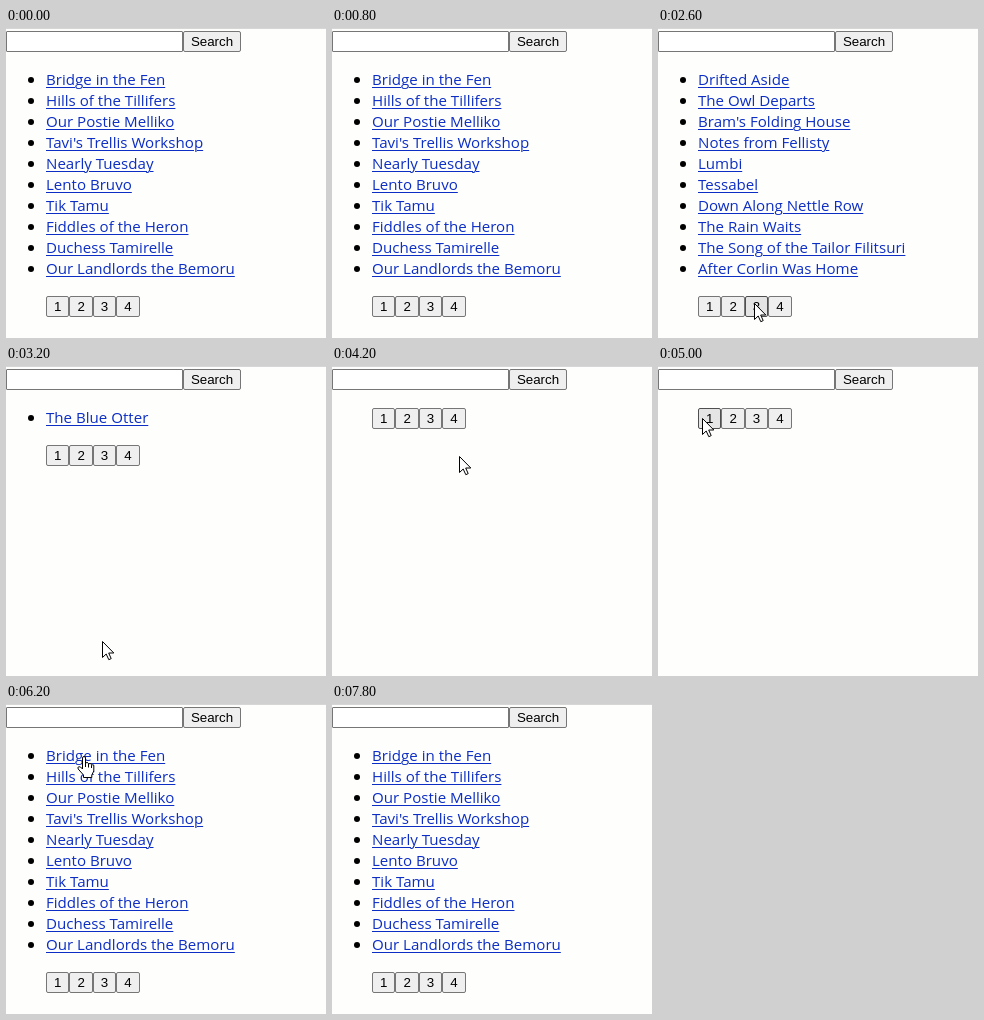
An HTML page that plays this animation: 320x310 px, repeating every 8000 ms.

```html
<!DOCTYPE html>
<html lang="en">
<head>
<meta charset="utf-8">
<title>Paged list</title>
<style>
html, body { margin: 0; width: 100%; height: 100%; overflow: hidden; background: #fefefd; }
body { position: relative; font: 15.1px/21px "Open Sans", sans-serif; color: #000; }
body > * { position: absolute; box-sizing: border-box; }
#edge { left: 0; top: 0; width: 100%; height: 1px; background: #d6d6d6; }
#field { left: 0; top: 3px; width: 177px; height: 21px; border: 1px solid #767676; border-radius: 1px; background: #fff; }
.button {
  box-sizing: border-box; height: 21px; border: 1px solid #767676; border-radius: 2px;
  background: #efefef; font: 13.333px/19px "Liberation Sans", Arial, sans-serif; text-align: center;
}
.button.hover { background: #e5e5e5; border-color: #4f4f4f; }
#search { left: 177px; top: 3px; width: 58px; }
#list { left: 40px; top: 41px; margin: 0; padding: 0; list-style: none; white-space: nowrap; }
#list li { position: relative; height: 21px; }
#list li::before {
  content: ""; position: absolute; left: -18px; top: 8px;
  width: 6px; height: 6px; border-radius: 50%; background: #000;
}
#list span { color: #0c2ec4; text-decoration: underline 1px; text-underline-offset: 2px; }
#pager { left: 40px; display: flex; }
#pager .button { width: 23.4px; }
#pointer { left: 0; top: 0; width: 24px; height: 26px; overflow: visible; pointer-events: none; }
#pointer path { fill: #fff; stroke: #000; stroke-width: 1; stroke-linejoin: round; }
</style>
</head>
<body>
<div id="edge"></div>
<div id="field"></div>
<div id="search" class="button">Search</div>
<ul id="list"></ul>
<div id="pager">
  <div class="button">1</div><div class="button">2</div><div class="button">3</div><div class="button">4</div>
</div>
<svg id="pointer">
  <path id="arrow" d="M.5 .5V16.5L4.2 13L6.8 18.7L9.2 17.6L6.7 12H11.8Z"/>
  <g id="hand" transform="translate(-6 0)">
    <path d="M5.5 13V2Q5.5 .5 7 .5T8.5 2V7.5Q10 5 11.5 7.5V8.5Q13 6 14.5 8.5V9.5Q16.8 7.5 16.8 10V15L14.8 19V21.5H6.5V19L1.2 13Q.2 10 3.5 11Z"/>
    <path d="M8.5 7V11M11.5 8V11.5M14.5 9.5V12"/>
  </g>
</svg>
<script>
const LOOP = 8000, STEP = 200, TRAVEL = 800, CLICK_DELAY = 200;
const pages = [
  ["Bridge in the Fen", "Hills of the Tillifers", "Our Postie Melliko", "Tavi's Trellis Workshop",
   "Nearly Tuesday", "Lento Bruvo", "Tik Tamu", "Fiddles of the Heron", "Duchess Tamirelle",
   "Our Landlords the Bemoru"],
  ["Drifted Aside", "The Owl Departs", "Bram's Folding House", "Notes from Fellisty", "Lumbi",
   "Tessabel", "Down Along Nettle Row", "The Rain Waits", "The Song of the Tailor Filitsuri",
   "After Corlin Was Home"],
  ["The Blue Otter"],
  []
];
// Places the pointer reaches; those with a page are clicked.
const stops = [
  { at: 1000, x: 165, y: 180 },
  { at: 1800, x: 73, y: 280, page: 1 },
  { at: 2600, x: 96, y: 275, page: 2 },
  { at: 4000, x: 127, y: 90, page: 3 },
  { at: 5000, x: 44, y: 52, page: 0 },
  { at: 6200, x: 77, y: 52 },
  { at: 7600, x: 205, y: 312 }
];
const $ = id => document.getElementById(id);
const buttons = document.querySelectorAll(".button");
let shownPage = -1;

function showPage(index) {
  if (index === shownPage) return;
  shownPage = index;
  const titles = pages[index];
  $("list").innerHTML = titles.map(title => `<li><span>${title}</span></li>`).join("");
  $("pager").style.top = (titles.length ? 58 + 21 * titles.length : 42) + "px";
}

function pageAt(t) {
  const clicked = stops.filter(stop => "page" in stop && stop.at + CLICK_DELAY <= t).pop();
  return clicked ? clicked.page : 0;
}

function pointerAt(t) {
  const next = stops.findIndex(stop => stop.at > t);
  if (next < 1) return null;
  const from = stops[next - 1], to = stops[next];
  const k = Math.max(0, 1 - (to.at - t) / TRAVEL);
  const ease = k * k * (3 - 2 * k);
  const mix = (a, b) => Math.round(a + (b - a) * ease);
  return { x: mix(from.x, to.x), y: mix(from.y, to.y) };
}

function draw(now) {
  const t = Math.floor(now % LOOP / STEP) * STEP;
  showPage(pageAt(t));

  const tip = pointerAt(t);
  const target = tip && document.elementFromPoint(tip.x, tip.y + 1);
  const overLink = !!target && target.tagName === "SPAN";
  buttons.forEach(button => button.classList.toggle("hover", button === target));
  $("pointer").style.display = tip ? "" : "none";
  $("arrow").style.display = overLink ? "none" : "";
  $("hand").style.display = overLink ? "" : "none";
  if (tip) $("pointer").style.transform = `translate(${tip.x}px, ${tip.y}px)`;
  requestAnimationFrame(draw);
}
draw(performance.now());
</script>
</body>
</html>
```
